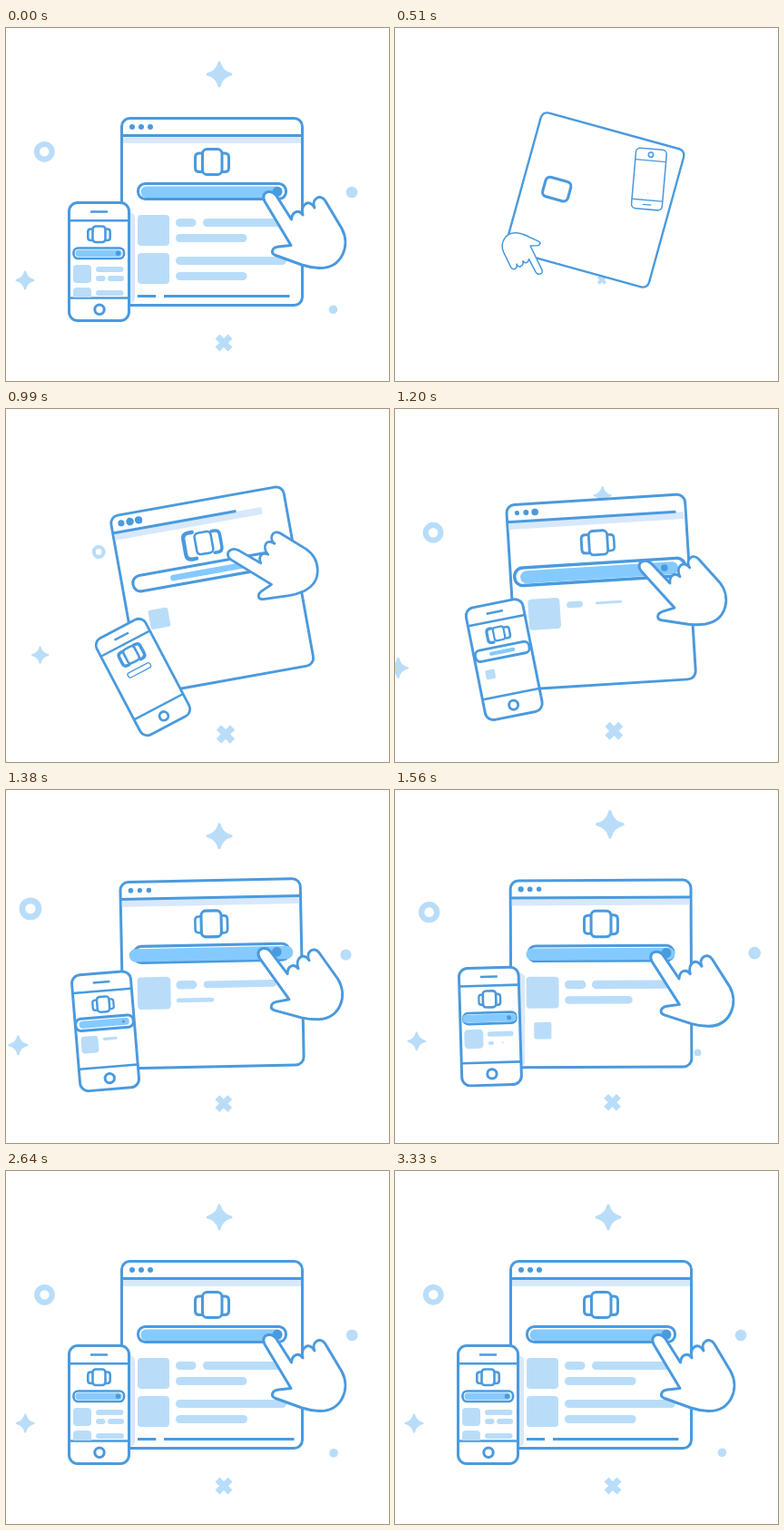
Recreate the animation shown at these times as an HTML page. Size 422 px wide and 389 px high, loop 3510 ms.

```html
<!DOCTYPE html>
<html lang="en">
<head>
<meta charset="utf-8">
<title>Responsive layout</title>
<style>
  html, body { margin: 0; width: 100%; height: 100%; overflow: hidden; background: #fff; }
  svg { display: block; width: 100vw; height: 100vh; }
  .line { fill: none; stroke: #4a9ade; stroke-width: 3; stroke-linecap: round; stroke-linejoin: round; }
  .body { fill: #fff; }
  .thin { stroke-width: 2.6; }
  .dark { fill: #4a9ade; }
  .fill { fill: #85caff; }
  .soft { fill: #b9ddf9; }
  .shade { fill: #d8e8fb; }
</style>
</head>
<body>
<svg viewBox="0 0 422 389" xmlns="http://www.w3.org/2000/svg">
  <defs>
    <path id="spark" class="soft" stroke="#b9ddf9" stroke-width="3" stroke-linejoin="round"
      d="M0-13Q2.5-2.5 13 0Q2.5 2.5 0 13Q-2.5 2.5-13 0Q-2.5-2.5 0-13Z"/>
    <clipPath id="screen"><rect x="70" y="213" width="65" height="84"/></clipPath>
  </defs>

  <!-- floating shapes -->
  <g data-move="float 910 214 197"><use href="#spark" x="235" y="51"/></g>
  <g data-move="float 730 214 197"><circle cx="42.3" cy="136.3" r="8.3" fill="none" stroke="#b9ddf9" stroke-width="6.2"/></g>
  <g data-move="float 580 214 197"><use href="#spark" transform="translate(21 278) scale(.73)"/></g>
  <g data-move="float 430 214 197"><path d="M233 340l14 14m0-14l-14 14" fill="none" stroke="#b9ddf9" stroke-width="7"/></g>
  <g data-move="float 940 214 197"><circle class="soft" cx="381" cy="181" r="6.3"/></g>
  <g data-move="float 1205 214 197"><circle class="soft" cx="360.5" cy="310.3" r="4.8"/></g>

  <!-- browser window -->
  <g data-move="spin 30 214.4 198.2">
    <rect class="line body" x="127.5" y="99.5" width="199" height="206" rx="9"/>
    <rect class="shade" x="129" y="119" width="196" height="8" data-move="wipe 250 129 119"/>
    <path class="line" style="stroke-linecap:butt" d="M127 118.5H327" data-move="wipe 370 127 118"/>
    <circle class="dark" cx="139" cy="109" r="3" data-move="pop 560 139 109"/>
    <circle class="dark" cx="149" cy="109" r="3" data-move="pop 680 149 109"/>
    <circle class="dark" cx="159" cy="109" r="3" data-move="pop 800 159 109"/>

    <path class="line" d="M216 138h-3q-4.500-4.500 4.500v11q0 4.500 4.500 4.500h3" visibility="hidden"/>
    <path class="line" d="M216 138H213Q208.500 138 208.500 142.500V154Q208.500 158.500 213 158.500H216" data-move="pop 680 216 148"/>
    <path class="line" d="M238 138H241Q245.500 138 245.500 142.500V154Q245.500 158.500 241 158.500H238" data-move="pop 560 240 148"/>
    <rect class="line body" x="216.500" y="133.500" width="21.500" height="28" rx="5" data-move="pop 350 227 148"/>

    <rect class="line body" x="145.500" y="171.500" width="163" height="17" rx="8" data-move="bar 687 227 180"/>
    <rect class="fill" x="148.500" y="174.500" width="156" height="12.500" rx="6" data-move="bar 855 227 180"/>
    <circle class="dark" cx="299" cy="180" r="5.300" data-move="row 1020 299 180"/>

    <rect class="soft" x="145" y="206" width="35" height="34" rx="4" data-move="row 835 162.500 223"/>
    <rect class="soft" x="187" y="210" width="22.500" height="9" rx="4.500" data-move="row 990 191 214.500"/>
    <rect class="soft" x="217" y="210" width="92" height="9" rx="4.500" data-move="row 1132 221 214.500"/>
    <rect class="soft" x="187" y="227" width="78.500" height="9" rx="4.500" data-move="row 1260 187 231.500"/>
    <rect class="soft" x="145" y="248" width="35" height="34" rx="4" data-move="row 1435 162.500 265"/>
    <rect class="soft" x="187" y="252" width="122" height="9" rx="4.500" data-move="row 1590 187 256.500"/>
    <rect class="soft" x="187" y="269" width="78.500" height="9" rx="4.500" data-move="row 1720 187 273.500"/>
    <path class="dark" d="M145 294h20v3h-20z" data-move="row 1828 145 295.500"/>
    <path class="dark" d="M174 294h138.500v3h-138.500z" data-move="row 1973 174 295.500"/>
  </g>

  <rect class="shade" x="98" y="203" width="44" height="101" rx="6" data-move="row 1150 110 255"/>

  <!-- phone -->
  <g data-move="spin 262 218 194">
    <rect class="line body" x="69.500" y="192.500" width="66" height="130" rx="9.500"/>
    <path class="line thin" style="stroke-linecap:butt" d="M70 212.300H135M70 297.500H135M93 202.500h19"/>
    <circle class="line" cx="103" cy="310.200" r="5.200"/>
    <g clip-path="url(#screen)">
      <path class="line thin" d="M95 221.500H93.500Q90.300 221.500 90.300 224.500V231Q90.300 234 93.500 234H95" data-move="pop 800 95 227.500"/>
      <path class="line thin" d="M110 221.500H111.500Q114.700 221.500 114.700 224.500V231Q114.700 234 111.500 234H110" data-move="pop 690 110 227.500"/>
      <rect class="line thin body" x="95.500" y="218.500" width="14" height="17.500" rx="3.500" data-move="pop 500 102.500 227"/>

      <rect class="line thin body" x="74.500" y="242.500" width="55.500" height="11.500" rx="5" data-move="bar 860 102.500 248"/>
      <rect class="fill" x="76.500" y="244.500" width="51" height="7.500" rx="3.500" data-move="bar 1060 102.500 248"/>
      <circle class="dark" cx="123.500" cy="248.300" r="2.700" data-move="row 1250 123.500 248.300"/>

      <rect class="soft" x="74" y="261" width="20" height="20" rx="4" data-move="row 1075 84 271"/>
      <rect class="soft" x="99" y="263" width="30.500" height="6" rx="3" data-move="row 1260 99 266"/>
      <rect class="soft" x="99" y="273" width="10.500" height="6" rx="3" data-move="row 1420 101 276"/>
      <rect class="soft" x="112" y="273" width="18" height="6" rx="3" data-move="row 1530 115 276"/>
      <rect class="soft" x="74" y="286" width="20" height="20" rx="4" data-move="row 1650 84 296"/>
      <rect class="soft" x="99" y="289" width="30.500" height="6" rx="3" data-move="row 1820 99 292"/>
    </g>
  </g>

  <!-- hand -->
  <g data-move="spin 262 205 243">
    <path class="line body" d="M285 191C282 185 285 181 289 180.500C293 180 296 182 298 185L314.500 211
      C315 203 322 199 327 206C324 195 334 187 340 198C336 189 346 182 351.500 190L370 221
      C380 240 370 265 345 264.500C338 264 332 263 326 261L297 250.500C291 248 293 242 300 241L314 239.500Z"/>
  </g>
</svg>

<script>
const LOOP = 3510, START = 30;

// Damped waves: amplitude, half-life, crossing time, period (ms)
const waves = {
  pop: [1.34, 209, 110, 820],
  bar: [1, 200, 270, 1080],
  row: [1, 140, 350, 1400],
  float: [0.85, 204, 470, 880]
};

function wave([amp, half, cross, period], t) {
  return 1 + amp * 2 ** (-t / half) * Math.sin((t - cross) * 2 * Math.PI / period);
}

// Time left for cubic-bezier(.23, 1, .32, 1)
function quintLeft(x) {
  let lo = 0, hi = 1;
  for (let i = 0; i < 24; i++) {
    const s = (lo + hi) / 2, r = 1 - s;
    if (0.69 * s * r * r + 0.96 * s * s * r + s ** 3 < x) lo = s; else hi = s;
  }
  return (1 - lo) ** 3;
}

const clamp = v => Math.min(1, Math.max(0, v));
const inOut = x => x < 0.5 ? 2 * x * x : 1 - 2 * (1 - x) ** 2;

function pose(kind, t) {
  if (t <= 0) return 'scale(0)';
  if (kind === 'spin') {
    const left = t >= 1840 ? 0 : quintLeft(t / 1840);
    return `rotate(${-360 * left}) scale(${1 - left})`;
  }
  if (kind === 'wipe') return `scale(${inOut(clamp(t / 1000))} 1)`;
  let size = wave(waves[kind], t);
  if (kind === 'float') size *= 1 - (1 - clamp(t / 180)) ** 2;
  return `scale(${Math.max(0, size)})`;
}

const parts = [...document.querySelectorAll('[data-move]')].map(el => {
  const [kind, start, x, y] = el.dataset.move.split(' ');
  return { el, kind, start: +start, x: +x, y: +y };
});

function draw(t) {
  const time = t < START ? 1e5 : t;
  for (const { el, kind, start, x, y } of parts) {
    el.setAttribute('transform', `translate(${x} ${y}) ${pose(kind, time - start)} translate(${-x} ${-y})`);
  }
}

const begin = performance.now();
function tick() {
  draw((performance.now() - begin) % LOOP);
  requestAnimationFrame(tick);
}
tick();
</script>
</body>
</html>
```
